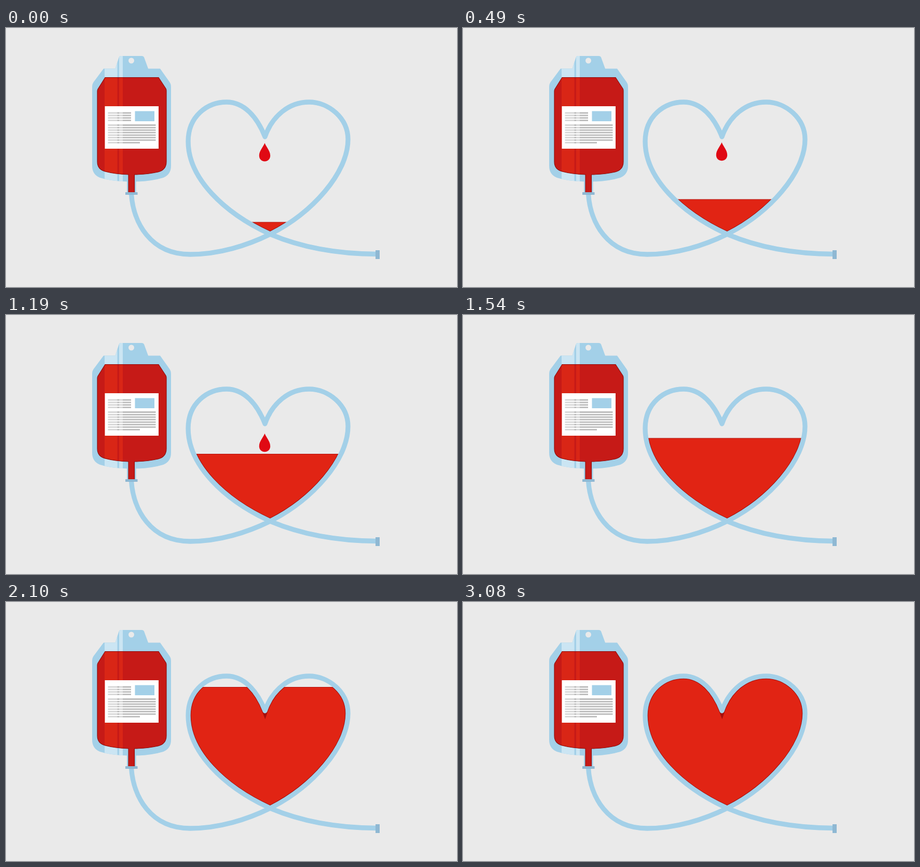
Write an HTML page that moves like this. It is 869 px wide and 500 px high and loops after 3.15 s.

```html
<!DOCTYPE html>
<html lang="en">
<head>
<meta charset="utf-8">
<title>Blood donation</title>
<style>
  html, body { margin: 0; width: 100%; height: 100%; overflow: hidden; background: #eaeaea; }
  svg { display: block; width: 869px; height: 500px; }
  .tube { fill: none; stroke: #a3d0e8; stroke-width: 9.3; stroke-linecap: round; stroke-linejoin: round; }
  .metal { fill: #8fb8d3; }
  .edge { stroke: #8f0d0c; stroke-width: 1.1; }
</style>
</head>
<body>
<svg viewBox="0 0 869 500">
  <defs>
    <path id="heart" d="M509 398C590 357 659 280 659 215C659 174 622 143 584 143C545 143 513 170 499 210C484 172 459 143 425 143C388 143 351 170 351 219C351 290 420 357 509 398Z"/>
    <path id="bag" d="M188 78.500H210.500L217.500 57Q218.500 54 221 54H262Q265 54 266 56.500L274 78.500H297L315 104Q318 108 318 114V266Q318 283 303 289Q280 296 250.500 296.500V318H233V296.500Q203 296 181 289Q166 283 166 266V114Q166 108 169 104Z"/>
    <path id="blood" d="M191 95.500H294L308 117Q309 119 309 121V258Q309 274 293 278Q272 282.500 247.500 283V317.500H236V283Q210 282 191 277Q176 273 176 258V122Q176 120 177 118Z"/>
    <path id="drop" d="M0 0C3 8 10.700 15 10.700 24.500C10.700 31 6 35.500 0 35.500S-10.700 31 -10.700 24.500C-10.700 15 -3 8 0 0Z"/>
    <path id="shine" d="M190 50H214.500V300H190ZM218 50H225V300H218Z"/>
    <clipPath id="inHeart"><use href="#heart"/></clipPath>
    <clipPath id="inBag"><use href="#bag"/></clipPath>
    <clipPath id="inBlood"><use href="#blood"/></clipPath>
    <clipPath id="below"><rect id="level" x="340" width="330" height="300"/></clipPath>
  </defs>

  <rect width="869" height="500" fill="#eaeaea"/>

  <g clip-path="url(#inHeart)">
    <g id="drops" fill="#e00914"></g>
    <g clip-path="url(#below)">
      <use href="#heart" fill="#e12414" stroke="#a50f0c" stroke-width="11.300"/>
    </g>
    <path id="surface" d="M340 .5H670" stroke="#b5120d" stroke-width="1.200"/>
  </g>

  <path class="tube" d="M241.500 320C245 375 278 437 355 437C410 437 465 420 509 398C590 357 659 280 659 215C659 174 622 143 584 143C545 143 513 170 499 210C484 172 459 143 425 143C388 143 351 170 351 219C351 290 420 357 509 398C570 424 640 436 714 436.500"/>
  <rect class="metal" x="712" y="429" width="8" height="17"/>

  <use href="#bag" fill="#a3d0e8"/>
  <use href="#shine" fill="#cbe5f3" clip-path="url(#inBag)"/>
  <circle cx="241.500" cy="63" r="5.500" fill="#eaeaea"/>
  <use href="#blood" fill="#c61a17"/>
  <use href="#shine" fill="#d92616" clip-path="url(#inBlood)"/>
  <use href="#blood" class="edge" fill="none"/>
  <rect class="metal" x="230" y="317" width="23.500" height="5"/>

  <rect x="190.500" y="151" width="103.500" height="82" fill="#fff"/>
  <rect x="248.500" y="160.500" width="37.500" height="19.500" fill="#a3d0e8"/>
  <g id="print" stroke="#bbb" stroke-width="2.800"></g>
  <path d="M191 160H214.500V225H191ZM218 160H225V225H218Z" fill="#fff" opacity=".4"/>
</svg>
<script>
  const LOOP = 3150, STEP = 70, DRIP = 560;
  const HANG = 520, HANG_Y = 221;
  // Liquid surface: time in ms, height in px
  const LEVELS = [[0, 375], [490, 331], [770, 307], [1190, 268.5], [1540, 238], [2100, 164.5], [2260, 140], [LOOP, 140]];
  const $ = id => document.getElementById(id);

  function add(parent, tag, attrs) {
    const el = document.createElementNS('http://www.w3.org/2000/svg', tag);
    for (const name in attrs) el.setAttribute(name, attrs[name]);
    return parent.appendChild(el);
  }

  const line = (y, end) => add($('print'), 'path', { d: `M196.5 ${y}H${end}` });
  for (let i = 0; i < 4; i++) line(164 + i * 4.8, 241);
  for (let i = 0; i < 7; i++) line(187.5 + i * 4.82, 288.5);
  line(221.4, 258);

  const drops = [0, 1, 2].map(() => add($('drops'), 'use', { href: '#drop' }));

  function surfaceAt(t) {
    const i = LEVELS.findIndex(([time]) => time > t);
    const [t0, y0] = LEVELS[i - 1], [t1, y1] = LEVELS[i];
    return y0 + (y1 - y0) * (t - t0) / (t1 - t0);
  }

  // A drop slows down as it swells out, hangs, then falls freely.
  function dropAt(age) {
    const d = age - HANG;
    return HANG_Y + (d < 0 ? -0.000364 : 0.00064) * d * d;
  }

  function draw(t) {
    const y = surfaceAt(t);
    $('level').setAttribute('y', y);
    $('surface').setAttribute('transform', `translate(0 ${y - 0.5})`);
    drops.forEach((drop, i) => {
      const age = t + (1 - i) * DRIP;
      drop.setAttribute('transform', `translate(498.5 ${dropAt(age)})`);
      drop.setAttribute('visibility', age > 150 ? 'visible' : 'hidden');
    });
  }

  const start = performance.now();
  function tick() {
    const t = (performance.now() - start) % LOOP;
    draw(Math.floor(t / STEP) * STEP);
    requestAnimationFrame(tick);
  }
  tick();
</script>
</body>
</html>
```
